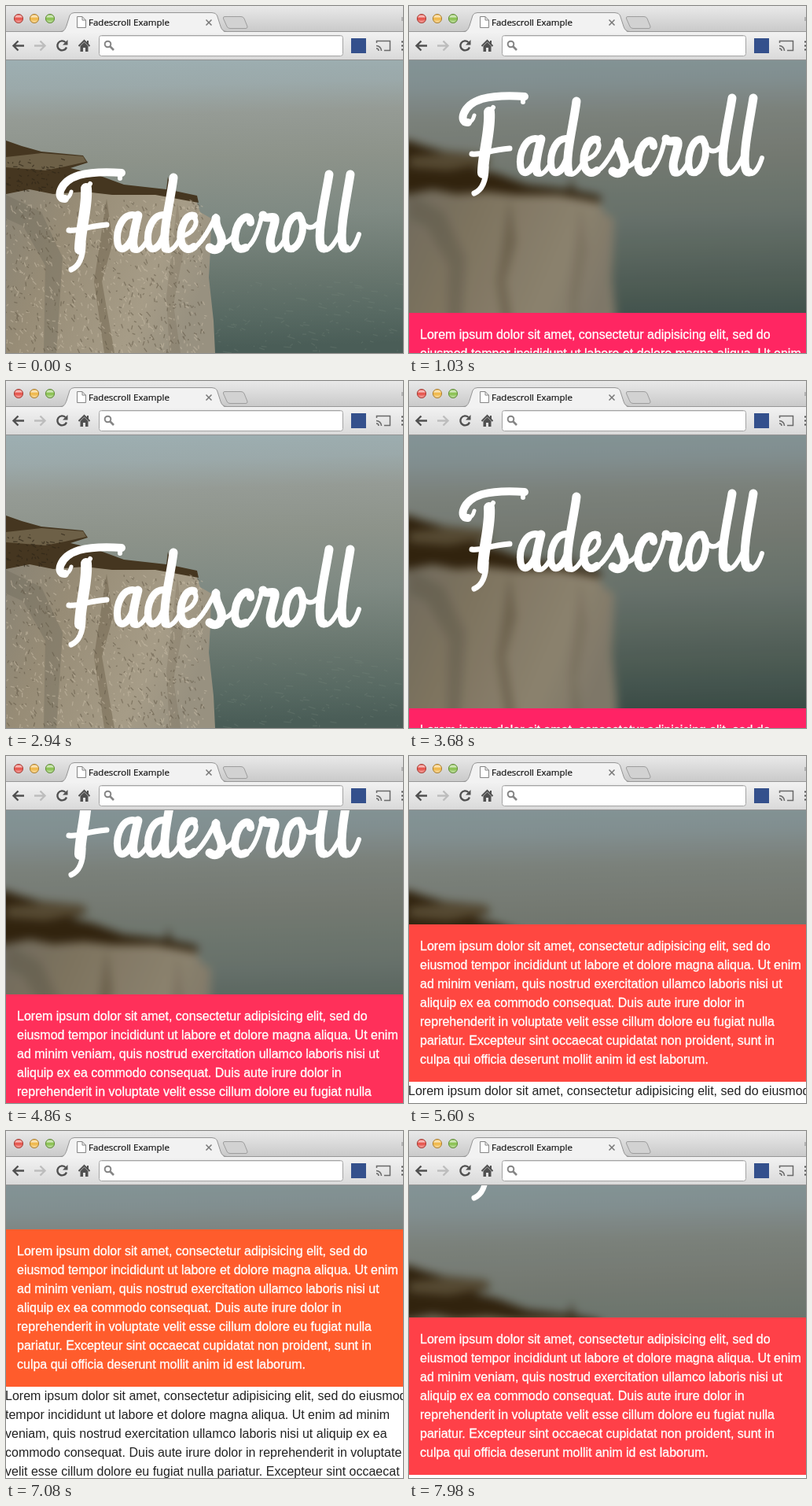
These frames come from a looping animation (505x441 px, 8 s). An HTML page:

```html
<!DOCTYPE html>
<html lang="en">
<head>
<meta charset="utf-8">
<title>Fadescroll Example</title>
<style>
html, body { margin: 0; width: 100%; height: 100%; overflow: hidden; background: #fff; }
#stage { position: relative; width: 505px; height: 441px; overflow: hidden; }
#stage > * { position: absolute; left: 0; top: 0; }
svg { display: block; overflow: hidden; }
#page { width: 505px; font: 16px/24px "Liberation Sans", Arial, sans-serif; white-space: nowrap; }
#box { position: absolute; top: 487px; width: 505px; height: 168px; padding: 16px 0; color: #fff; -webkit-text-stroke: .3px #fff; text-indent: 14px; }
#more { position: absolute; top: 687px; width: 505px; height: 300px; background: #fff; color: #222; overflow: hidden; text-indent: -1px; }
.pen { fill: none; stroke: #fff; stroke-linecap: round; stroke-linejoin: round; }
.icon { fill: none; stroke: #505050; stroke-width: 2.4; }
</style>
</head>
<body>
<div id="stage">
  <svg width="505" height="441">
    <defs>
      <linearGradient id="sky" gradientUnits="userSpaceOnUse" x1="0" y1="69" x2="10" y2="441">
        <stop offset="0" stop-color="#9dafb2"/>
        <stop offset=".1" stop-color="#9ba9aa"/>
        <stop offset=".2" stop-color="#959b95"/>
        <stop offset=".35" stop-color="#8d938a"/>
        <stop offset=".55" stop-color="#7f8a83"/>
        <stop offset=".75" stop-color="#69776f"/>
        <stop offset=".9" stop-color="#576962"/>
        <stop offset="1" stop-color="#4a5d57"/>
      </linearGradient>
      <linearGradient id="chalk" x1="0" x2="1" y1="0" y2=".35">
        <stop offset="0" stop-color="#837f73"/>
        <stop offset=".4" stop-color="#978c76"/>
        <stop offset=".8" stop-color="#a69c87"/>
        <stop offset="1" stop-color="#989180"/>
      </linearGradient>
      <g id="scene">
        <path d="M-40 20H545V481H-40Z" fill="url(#sky)"/>
        <path d="M-40 232L0 230 60 226 120 230 180 235 240 241 247 262 261 270 260 310 258 345 264 400 268 481H-40Z" fill="url(#chalk)"/>
        <path d="M-40 168L0 171 20 178 45 185 98 190 104 199 82 206 112 213 150 227 204 233 206 217 210 234 243 241 245 250 190 240 135 240 100 236 60 239 30 233 0 239 -40 240Z" fill="#453620"/>
        <path d="M0 192L45 187 98 191 102 198 75 204 50 209 0 205Z" fill="#6d6047"/>
        <path d="M0 240L45 262 72 320 64 441H48L50 330 22 280 0 270Z" fill="#6f695a" opacity=".4"/>
        <path d="M128 245L136 300 122 350 138 441H125L112 350Z" fill="#61563f" opacity=".4"/>
        <path d="M218 250L226 310 213 380 222 441H208L204 370Z" fill="#706650" opacity=".25"/>
      </g>
    </defs>
    <use href="#scene"/>
    <g id="grain"></g>
    <g id="haze"><g style="filter: blur(6px) brightness(.83) contrast(1.12)"><use href="#scene"/></g></g>
  </svg>

  <div id="page">
    <svg width="505" height="487" role="img" aria-label="Fadescroll">
      <g class="pen" stroke-width="10">
        <path d="M75 245C63 246 67 223 93 215C112 210 132 211 147 212"/>
        <path d="M102 232C104 254 94 286 94 309" stroke-width="14"/>
        <path d="M80 285C92 287 101 280 128 278" stroke-width="7"/>
        <path d="M98 302C98 321 92 331 83 335" stroke-width="7"/>
        <path d="M75 246Q81 244 83 236" stroke-width="5"/>
        <path d="M104 230L107 226" stroke-width="6"/>
        <path d="M145 215L145 219" stroke-width="6"/>
      </g>
      <g class="pen" stroke-width="11">
        <path d="M164 266C149 262 139 284 142 302C145 314 154 309 161 294" stroke-width="9"/>
        <path d="M168 266C164 282 159 300 163 308"/>
        <path d="M203 266C188 262 178 284 181 302C184 314 194 309 200 294" stroke-width="9"/>
        <path d="M213 218C209 250 198 290 203 308"/>
        <path d="M239 267C229 263 220 284 223 300C226 310 233 311 239 306" stroke-width="10"/>
        <path d="M267 270C265 282 277 290 274 302C272 310 265 312 259 307"/>
        <path d="M311 275C311 264 299 266 293 284C288 303 294 313 305 307" stroke-width="10"/>
        <path d="M327 266C331 274 344 262 342 274C339 288 333 299 338 308"/>
        <path d="M373 266C358 264 351 298 359 308C371 314 385 282 373 266Z" stroke-width="9"/>
        <path d="M411 214C407 240 396 285 400 303Q401 308 404 308"/>
        <path d="M438 214C434 240 424 285 428 303Q429 308 432 308"/>
      </g>
      <g class="pen" stroke-width="6">
        <path d="M163 310C169 314 176 305 182 294"/>
        <path d="M203 310C210 314 217 304 223 293C238 289 246 276 239 268"/>
        <path d="M237 308C246 305 255 291 267 267"/>
        <path d="M275 302Q284 301 291 290"/>
        <path d="M303 309C313 305 321 288 326 264"/>
        <path d="M338 310C344 313 350 305 355 296"/>
        <path d="M375 271Q382 285 392 280L399 274"/>
        <path d="M403 310C412 312 418 302 426 286"/>
        <path d="M432 310C439 312 445 303 449 290"/>
      </g>
    </svg>
    <div id="box"><div>Lorem ipsum dolor sit amet, consectetur adipisicing elit, sed do</div><div>eiusmod tempor incididunt ut labore et dolore magna aliqua. Ut enim</div><div>ad minim veniam, quis nostrud exercitation ullamco laboris nisi ut</div><div>aliquip ex ea commodo consequat. Duis aute irure dolor in</div><div>reprehenderit in voluptate velit esse cillum dolore eu fugiat nulla</div><div>pariatur. Excepteur sint occaecat cupidatat non proident, sunt in</div><div>culpa qui officia deserunt mollit anim id est laborum.</div></div>
    <div id="more"><div>Lorem ipsum dolor sit amet, consectetur adipisicing elit, sed do eiusmod</div><div>tempor incididunt ut labore et dolore magna aliqua. Ut enim ad minim</div><div>veniam, quis nostrud exercitation ullamco laboris nisi ut aliquip ex ea</div><div>commodo consequat. Duis aute irure dolor in reprehenderit in voluptate</div><div>velit esse cillum dolore eu fugiat nulla pariatur. Excepteur sint occaecat</div></div>
  </div>

  <svg width="505" height="69">
    <defs>
      <linearGradient id="bar" x2="0" y2="1"><stop stop-color="#e9e9e9"/><stop offset="1" stop-color="#c8c8c8"/></linearGradient>
      <linearGradient id="tools" x2="0" y2="1"><stop stop-color="#f2f2f2"/><stop offset="1" stop-color="#d9d9d9"/></linearGradient>
      <linearGradient id="gloss" x2="0" y2="1"><stop stop-color="#fff" stop-opacity=".1"/><stop offset=".2" stop-color="#fff" stop-opacity=".75"/><stop offset=".5" stop-color="#fff" stop-opacity="0"/><stop offset="1" stop-color="#fff" stop-opacity=".55"/></linearGradient>
    </defs>
    <rect width="505" height="34" fill="url(#bar)"/>
    <rect y="33" width="505" height="36" fill="url(#tools)"/>
    <path d="M0 32.5H505" stroke="#989898"/>
    <path d="M0 68.5H505" stroke="#929292"/>
    <g stroke-width=".8">
      <circle cx="16" cy="16" r="5.6" fill="#e5483f" stroke="#963229"/>
      <circle cx="36" cy="16" r="5.6" fill="#efb33c" stroke="#9b6f24"/>
      <circle cx="56" cy="16" r="5.6" fill="#82bd45" stroke="#527d2d"/>
    </g>
    <g fill="url(#gloss)"><circle cx="16" cy="16" r="5"/><circle cx="36" cy="16" r="5"/><circle cx="56" cy="16" r="5"/></g>
    <path d="M68 34C74 33 75 30 77 25L81 12Q82.500 8.500 87 8.500H262Q267 8.500 268.500 12L273 26Q275 33 281 34Z" fill="#f2f2f2"/>
    <path d="M68 32.500C74 32.500 75 30 77 25L81 12Q82.500 8.500 87 8.500H262Q267 8.500 268.500 12L273 26Q275 32.500 281 32.500" fill="none" stroke="#959595"/>
    <path d="M278 13.500H299Q302 13.500 303 16L307 26Q307.500 28.500 305 28.500H285Q282 28.500 281 26L276.500 16Q276 13.500 278 13.500Z" fill="#d2d2d2" stroke="#9d9d9d"/>
    <path d="M90.500 13.500H97L101.500 18V27.500H90.500ZM97 13.500V18H101.500" fill="#fff" stroke="#858585"/>
    <text x="105" y="25" font-family="'Open Sans', sans-serif" font-size="11.5" fill="#111" stroke="#111" stroke-width=".2">Fadescroll Example</text>
    <path d="M254.500 17.500L261.500 24.500M261.500 17.500L254.500 24.500" stroke="#777" stroke-width="1.5"/>
    <g class="icon">
      <path d="M23 50.500H10M15.500 44.500L9.500 50.500L15.500 56.500"/>
      <path d="M36 50.500H49M43.500 44.500L49.500 50.500L43.500 56.500" stroke="#bdbdbd"/>
      <path d="M75.500 46A6 6 0 1 0 77 52.500"/>
      <path d="M78.500 43V49.500H72Z" fill="#505050" stroke="none"/>
      <path d="M92.500 51L99.500 44L106.500 51M104 44V48" stroke-width="2"/>
      <path d="M94.500 51L99.500 46L104.500 51V58H101V53H98V58H94.500Z" fill="#505050" stroke="none"/>
    </g>
    <rect x="118.500" y="37.500" width="310" height="26" rx="3" fill="#fff" stroke="#a3a3a3"/>
    <path d="M120 38.500H427" stroke="#e2e2e2"/>
    <g fill="none" stroke="#858585" stroke-width="2"><circle cx="129.500" cy="48.500" r="3.800"/><path d="M132.500 51.500L137 56" stroke-width="2.600"/></g>
    <rect x="439" y="41" width="19" height="19" fill="#34508c"/>
    <g fill="none" stroke="#6a6a6a" stroke-width="1.500">
      <path d="M471.500 47V44.500H488.500V56.500H481M471 50.500A6.500 6.500 0 0 1 477.500 57M471 54A3 3 0 0 1 474 57"/>
    </g>
    <path d="M503 45.500H505M503 50.500H505M503 55.500H505" stroke="#555" stroke-width="2"/>
    <path d="M504 14V19" stroke="#888"/>
  </svg>
</div>
<script>
const LOOP = 8000;
const $ = id => document.getElementById(id);

// Each run: start time followed by the scroll offsets of its even steps.
const STEP = 147.2;
const runs = [
  [0, 0],
  [150, 6, 18, 34, 51, 68, 84, 97, 108],
  [1330, 122, 132],
  [1770, 110, 80, 54, 38, 26, 16, 9, 4],
  [2940, 0],
  [3390, 18, 44, 71, 95, 115, 130, 140, 146],
  [4570, 158, 171, 184, 200, 218, 236, 255, 273],
  [5750, 290, 306, 322, 338, 350, 358, 364],
  [7080, 362, 350, 332, 311, 290, 270, 250]
];
const steps = runs.flatMap(([start, ...tops]) =>
  tops.map((top, i) => [start + i * STEP - (i ? 5 : 0), top]));

// Scroll offset and box colour.
const tints = [[0, 255, 30, 103], [71, 255, 35, 101], [184, 255, 48, 90], [250, 255, 64, 72], [338, 255, 90, 45], [370, 255, 93, 44]];

function tint(s) {
  const i = Math.max(1, tints.findIndex(t => t[0] >= s));
  const a = tints[i - 1], b = tints[i];
  const k = (s - a[0]) / (b[0] - a[0]);
  return `rgb(${[1, 2, 3].map(c => Math.round(a[c] + (b[c] - a[c]) * k))})`;
}

// Rough chalk and faint ripples on the water.
let seed = 7;
const rand = () => (seed = seed * 16807 % 2147483647) / 2147483647;
function marks(count, x, y, w, h, dx, dy, color, alpha) {
  let d = "";
  for (let i = 0; i < count; i++) {
    d += `M${x + rand() * w} ${y + rand() * h}l${(rand() - .3) * dx} ${rand() * dy}`;
  }
  return `<path d="${d}" fill="none" stroke="${color}" stroke-width="1.3" opacity="${alpha}"/>`;
}
$("grain").innerHTML =
  marks(420, 0, 246, 254, 195, 6, 6, "#5e5443", .5) +
  marks(520, 0, 246, 254, 195, 7, 6, "#c9bea7", .5) +
  marks(60, 0, 194, 75, 42, 9, 3, "#2c2416", .6) +
  marks(120, 270, 350, 235, 90, 16, 3, "#7b8a80", .25);

function draw(now) {
  const t = now % LOOP;
  let s = 0;
  for (const [at, top] of steps) if (t >= at) s = top;
  $("page").style.transform = `translateY(${-s}px)`;
  $("box").style.background = tint(s);
  $("haze").style.opacity = Math.min(1, s / 62);
}

const begin = performance.now();
function tick() {
  draw(performance.now() - begin);
  requestAnimationFrame(tick);
}
tick();
</script>
</body>
</html>
```
